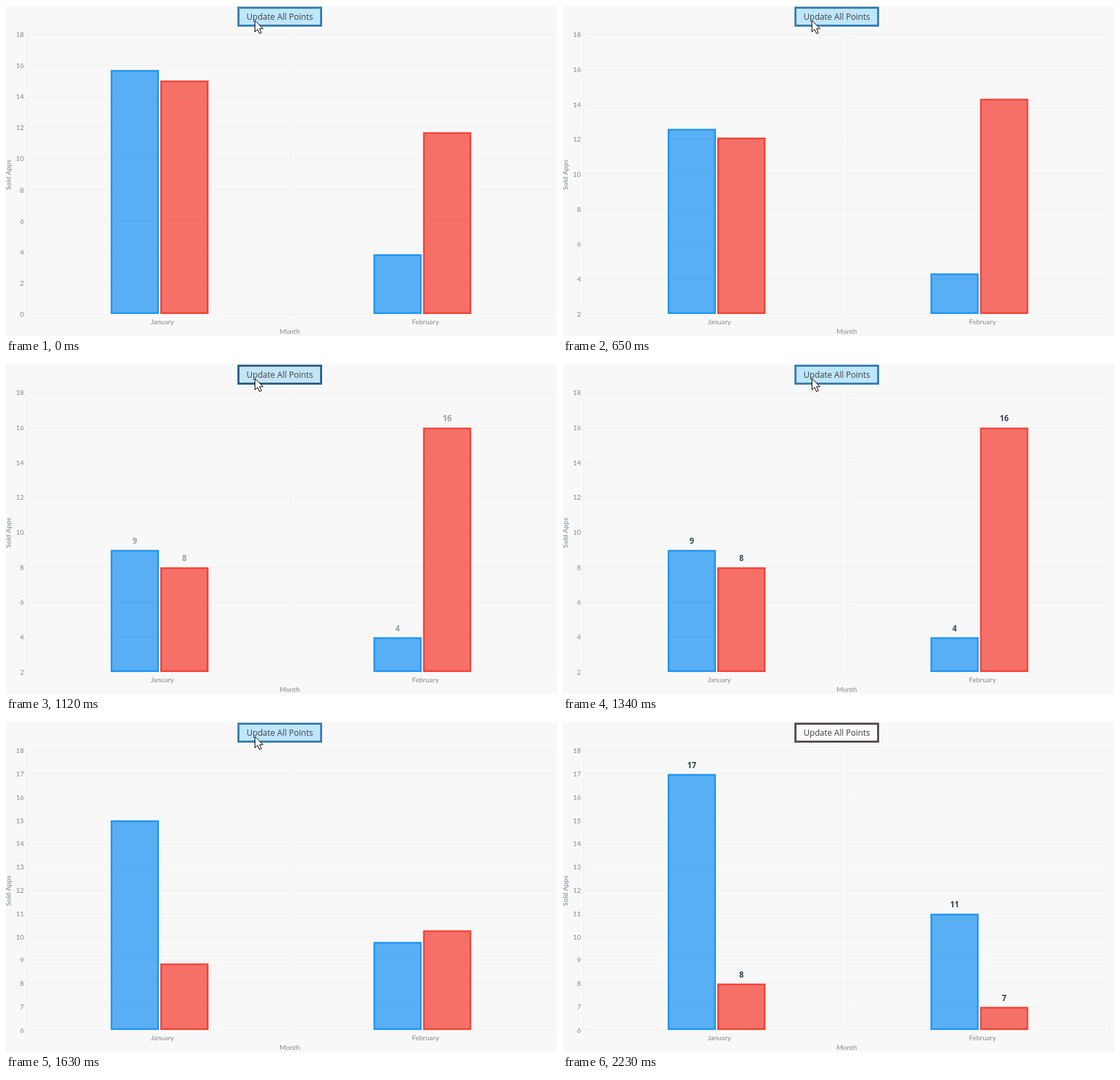
An HTML page for the animation above (2760 ms loop, 800 by 479 pixels).

```html
<!DOCTYPE html>
<html lang="en">
<head>
<meta charset="utf-8">
<title>Sold apps by month</title>
<style>
  html, body { margin: 0; width: 100%; height: 100%; overflow: hidden; background: #f8f8f8; }
  svg { display: block; width: 100vw; height: 100vh; }
  text { text-anchor: middle; }
  .axis text { font: 10px Lato, sans-serif; fill: #878787; }
  .axis .ticks text { text-anchor: end; }
  .axis .title { font-weight: 700; fill: #9aa2a7; }
  .grid { stroke: #000; stroke-opacity: .026; stroke-width: 1.2; }
  .bar { stroke-width: 2.5; fill-opacity: .74; }
  .value { font: 700 11.5px "Open Sans", sans-serif; fill: #263238; }
  #button rect { fill: #fafafa; stroke: #544f51; stroke-width: 3; }
  #button text { font: 12.1px "Open Sans", sans-serif; fill: #3f3f3f; }
  #button.hover rect { fill: #bee6fd; stroke: #3c7fb1; }
  #button.pressed rect { fill: #c4e5f6; stroke: #2c628b; }
  #cursor { fill: #fff; stroke: #000; stroke-width: 1; stroke-linejoin: miter; }
</style>
</head>
<body>
<svg viewBox="0 0 800 479" preserveAspectRatio="none">
  <g id="bars"></g>
  <g class="grid">
    <g id="lines"></g>
    <path d="M30 41V447M412.500 41V447M794.500 41V447"/>
  </g>
  <g id="values"></g>
  <g class="axis">
    <g id="ticks" class="ticks"></g>
    <text x="227" y="462">January</text>
    <text x="609" y="462">February</text>
    <text x="412" y="476">Month</text>
    <text class="title" transform="translate(7 245) rotate(-90)">Sold Apps</text>
  </g>
  <g id="button">
    <rect x="337.500" y="2.500" width="120" height="26"/>
    <text x="397.500" y="20">Update All Points</text>
  </g>
  <path id="cursor" d="M.5 .5V17L4.300 13.400L7 19.500L9.800 18.300L7.200 12.400H12.200Z"/>
</svg>
<script>
  const LOOP = 2760, FADE = 500, BOTTOM = 447, HEIGHT = 405.6, MAX = 18;
  const COLORS = ['#2196f3', '#f44336'];
  const LEFTS = [152, 224, 533.5, 605.5];

  // Each update: bars travel from start to end, then the values fade in.
  const updates = [
    { start: 0, end: 60, min: 0, step: 2, data: [16, 16, 3, 12] },
    { start: 405, end: 895, min: 2, step: 2, data: [9, 8, 4, 16] },
    { start: 1388, end: 1758, min: 6, step: 1, data: [17, 8, 11, 7] }
  ];
  const presses = [[130, 200], [1120, 1190]];
  const leave = { start: 1840, end: 2150 };

  const $ = id => document.getElementById(id);
  const clamp = v => Math.max(0, Math.min(1, v));
  const progress = (t, a, b) => clamp((t - a) / (b - a));
  const yOf = (v, min) => BOTTOM - (v - min) * HEIGHT / (MAX - min);

  function add(parent, tag, attrs, text) {
    const el = document.createElementNS('http://www.w3.org/2000/svg', tag);
    for (const k in attrs) el.setAttribute(k, attrs[k]);
    if (text !== undefined) el.textContent = text;
    parent.appendChild(el);
    return el;
  }

  let tops = [15.73, 15.05, 3.86, 11.72].map(v => yOf(v, 0));
  for (const u of updates) {
    u.from = tops;
    u.to = tops = u.data.map(v => yOf(v, u.min));
  }

  const bars = LEFTS.map((x, i) => add($('bars'), 'rect', {
    class: 'bar', x: x + 1.25, width: 67.5, fill: COLORS[i % 2], stroke: COLORS[i % 2]
  }));
  const values = LEFTS.map(x => add($('values'), 'text', { class: 'value', x: x + 35 }));

  let current = null;
  function showScale(u) {
    current = u;
    $('ticks').replaceChildren();
    $('lines').replaceChildren();
    for (let v = u.min; v <= MAX; v += u.step) {
      const y = yOf(v, u.min);
      add($('ticks'), 'text', { x: 26, y: y + 3.8 }, v);
      add($('lines'), 'path', { d: `M30 ${y}H795` });
    }
    values.forEach((el, i) => { el.textContent = u.data[i]; });
  }

  function draw(t) {
    const u = updates.filter(s => t >= s.start).pop();
    if (u !== current) showScale(u);

    const p = progress(t, u.start, u.end);
    const fade = progress(t, u.end, u.end + FADE);
    bars.forEach((bar, i) => {
      const top = u.from[i] + (u.to[i] - u.from[i]) * p + .3;
      bar.setAttribute('y', top + 1.25);
      bar.setAttribute('height', BOTTOM - top - 2.5);
      values[i].setAttribute('y', top - 9);
      values[i].setAttribute('opacity', fade);
    });

    const out = progress(t, leave.start, leave.end);
    const y = 20.5 + 465 * out * out;
    $('cursor').setAttribute('transform', `translate(361 ${y})`);
    const pressed = presses.some(([a, b]) => t >= a && t < b);
    $('button').setAttribute('class', pressed ? 'pressed' : y < 30 ? 'hover' : '');
  }

  let origin;
  function tick(now) {
    origin ??= now;
    draw((now - origin) % LOOP);
    requestAnimationFrame(tick);
  }
  draw(0);
  requestAnimationFrame(tick);
</script>
</body>
</html>
```
